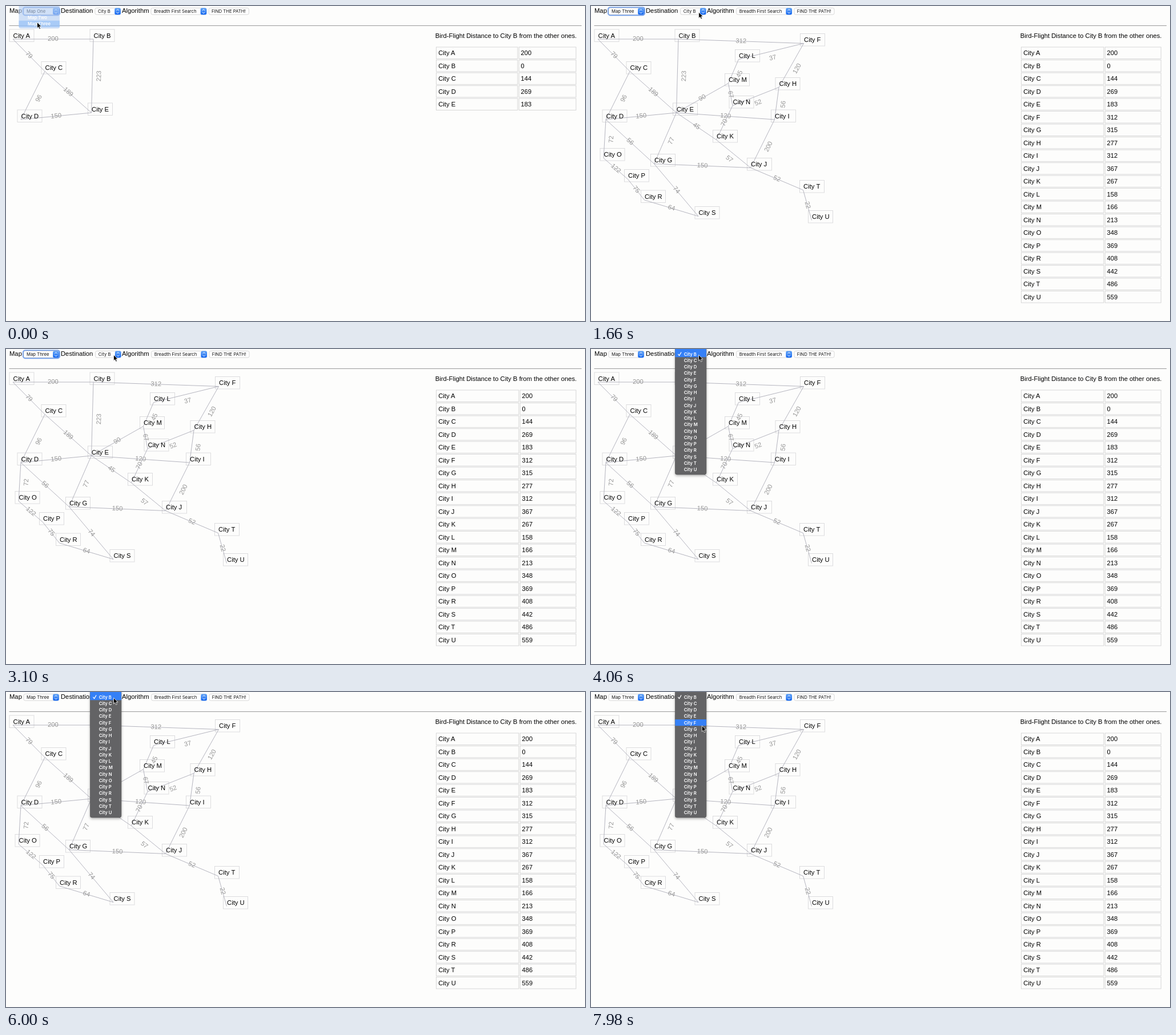
Recreate the animation shown at these times as an HTML page. Size 1014 by 552 pixels, loop 8 s.

```html
<!DOCTYPE html>
<html lang="en">
<head>
<meta charset="utf-8">
<title>Path finder</title>
<style>
html, body { margin: 0; width: 100%; height: 100%; overflow: hidden; background: #fdfdfc; }
svg { display: block; width: 1014px; height: 552px; }
text { font: 11.25px "Liberation Sans", Arial, sans-serif; fill: #000; }
.ui { font: 7.73px Inter, sans-serif; fill: #111; }
.item { font: 600 7.73px Inter, sans-serif; fill: #fff; }
.cost { fill: #969696; text-anchor: middle; }
.road { stroke: #adadb8; stroke-width: .9; }
.box { fill: none; stroke: #d9d9db; stroke-width: .9; }
.cell { fill: none; stroke: #d3d3d3; stroke-width: .9; }
.control { fill: #fff; stroke: #c6c6c6; stroke-width: .7; }
</style>
</head>
<body>
<svg id="stage" viewBox="0 0 1014 552" xmlns="http://www.w3.org/2000/svg">
  <defs>
    <linearGradient id="blue" x2="0" y2="1">
      <stop offset="0" stop-color="#62a4f8"/><stop offset="1" stop-color="#1768ef"/>
    </linearGradient>
    <filter id="shade" x="-30%" y="-10%" width="160%" height="120%">
      <feDropShadow dx="0" dy="2" stdDeviation="2.2" flood-opacity=".3"/>
    </filter>
  </defs>
</svg>
<script>
const LOOP = 8000, MAP_AT = 110, OPEN_AT = 3700, ROW = 11.25;
const svg = document.getElementById("stage");

// top left corner of each city's label box
const cities = {
  A: [6, 41], B: [147, 41], C: [62, 97.5], D: [20, 182], E: [143.5, 170],
  F: [366.5, 48.5], G: [104.5, 259.5], H: [323, 125.5], I: [315.5, 182], J: [273.5, 266.5],
  K: [213.5, 217.5], L: [252.5, 76.5], M: [234.5, 118.5], N: [242, 157.5], O: [16, 249.5],
  P: [58.5, 286.5], R: [87.5, 323], S: [182, 351.5], T: [365.5, 305.5], U: [380.5, 358.5]
};
const birdFlight = [200, 0, 144, 269, 183, 312, 315, 277, 312, 367,
  267, 158, 166, 213, 348, 369, 408, 442, 486, 559];
const names = Object.keys(cities);
// roads pointing left carry their cost below the line
const smallRoads = "AB200 AC79 CE189 BE223 CD96 DE150";
const largeRoads = smallRoads + " BF312 EM90 FL37 LM45 MN67 HN52 HI56 FH120 EI120 KN70" +
  " EK45 JK57 EG77 DO72 DG56 OP122 PR75 RS64 GS74 GJ150 IJ200 JT52 TU22";

function add(parent, tag, attrs, content) {
  const el = document.createElementNS("http://www.w3.org/2000/svg", tag);
  for (const k in attrs) el.setAttribute(k, attrs[k]);
  if (content !== undefined) el.textContent = content;
  parent.append(el);
  return el;
}
const group = (parent, attrs) => add(parent, "g", attrs);
const rect = (parent, x, y, width, height, attrs) =>
  add(parent, "rect", { x, y, width, height, ...attrs });
const label = (parent, x, y, content, cls = "") =>
  add(parent, "text", { x, y, class: cls }, content);
const show = (el, on) => el.setAttribute("visibility", on ? "visible" : "hidden");

function drawRoad(parent, road) {
  const [x1, y1, x2, y2] = [...road.slice(0, 2)].flatMap(c => [cities[c][0] + 6, cities[c][1] + 17]);
  add(parent, "line", { x1, y1, x2, y2, class: "road" });
  const back = x2 < x1;
  const angle = Math.atan2(y2 - y1, x2 - x1) * 180 / Math.PI + (back ? 180 : 0);
  add(parent, "text", {
    class: "cost", y: back ? 15 : 3,
    transform: `translate(${(x1 + x2) / 2} ${(y1 + y2) / 2}) rotate(${angle})`
  }, road.slice(2));
}

function drawMap(count, roads, split) {
  const g = group(svg);
  const shown = names.slice(0, count);
  shown.forEach(c => rect(g, ...cities[c], 43, 21.5, { class: "box" }));
  roads.split(" ").forEach(r => drawRoad(g, r));
  shown.forEach((c, i) => {
    const y = 72 + i * 22.5;
    label(g, cities[c][0] + 6.6, cities[c][1] + 14.7, "City " + c);
    rect(g, 753.5, y, split - 753.5, 20.5, { class: "cell" });
    rect(g, split + 2.3, y, 995.9 - split, 20.5, { class: "cell" });
    label(g, 757.2, y + 14, "City " + c);
    label(g, split + 5.5, y + 14, birdFlight[i]);
  });
  return g;
}

function drawSelect(parent, x, width, value) {
  const g = group(parent);
  rect(g, x, 3.6, width, 11.4, { class: "control", rx: 2.6 });
  const ax = x + width - 10.4;
  rect(g, ax, 3.4, 10.7, 11.8, { rx: 2.6, fill: "url(#blue)" });
  add(g, "path", {
    d: `M${ax + 3.4} 7.9l2-2.1 2 2.1m-4 2.9l2 2.1 2-2.1`,
    fill: "none", stroke: "#fff", "stroke-width": 1, "stroke-linecap": "round"
  });
  return label(g, x + 5, 12, value, "ui");
}

label(svg, 6, 12, "Map");
label(svg, 96, 12, "Destination");
label(svg, 203, 12, "Algorithm");
add(svg, "line", { x1: 5.5, x2: 1008, y1: 34.4, y2: 34.4, stroke: "#8d8d8d", "stroke-width": .9 });
label(svg, 751.8, 56.2, "Bird-Flight Distance to City B from the other ones.");

const ring = rect(svg, 30, 2.4, 64, 13.8, { rx: 3.6, fill: "none", stroke: "#6d9cec", "stroke-width": 2 });
const mapValue = drawSelect(svg, 31, 61.5, "Map One");
const right = group(svg);
drawSelect(right, 156, 44.6, "City B");
drawSelect(right, 254, 97, "Breadth First Search");
rect(right, 355.3, 3.6, 70, 11.4, { class: "control", rx: 2.6 });
label(right, 360, 12, "FIND THE PATH!", "ui");

const small = drawMap(5, smallRoads, 896);
const large = drawMap(20, largeRoads, 898);

// closing map menu
const mapMenu = group(svg);
rect(mapMenu, 22.5, -4, 71.5, 43.5, { rx: 3.5, fill: "#b4cdf3", opacity: .62 });
rect(mapMenu, 22.5, 25.6, 71.5, ROW, { fill: "#8fbcf8", opacity: .6 });
label(mapMenu, 38, 23, "Map Two", "item");
label(mapMenu, 38, 34.2, "Map Three", "item");

// destination menu
const menu = group(svg);
rect(menu, 147.3, -4, 54.6, 224, { rx: 3.5, fill: "#646465", stroke: "#505050", "stroke-width": .6, filter: "url(#shade)" });
const mark = rect(menu, 147.3, 3, 54.6, ROW, { fill: "#3580f6" });
add(menu, "path", {
  d: "M152.7 9.2l1.9 2.3 3.3-5.6", fill: "none", stroke: "#fff", "stroke-width": 1.2,
  "stroke-linecap": "round", "stroke-linejoin": "round"
});
names.slice(1).forEach((c, i) => label(menu, 162.7, 11.5 + i * ROW, "City " + c, "item"));

const cursor = add(svg, "path", {
  d: "M0 0V10.4L2.4 8.2 4 12 5.9 11.2 4.3 7.5H7.6Z",
  fill: "#000", stroke: "#fff", "stroke-width": .8, "stroke-linejoin": "round"
});

// time, x, y of the pointer
const track = [[0, 54.5, 28.5], [260, 55, 28.5], [1300, 189, 11.5], [1660, 188.7, 11],
  [3100, 188.5, 10.3], [6600, 188.5, 10.3], [7260, 192.5, 35], [7980, 194.3, 59]];

function pointer(t) {
  let i = 1;
  while (i < track.length - 1 && t > track[i][0]) i++;
  const [a, b] = [track[i - 1], track[i]];
  let p = Math.min(1, (t - a[0]) / (b[0] - a[0]));
  if (i < 6) p = p * p * (3 - 2 * p);
  return [a[1] + (b[1] - a[1]) * p, a[2] + (b[2] - a[2]) * p];
}

function render(t) {
  const [x, y] = pointer(t), chosen = t >= MAP_AT, open = t >= OPEN_AT;
  cursor.setAttribute("transform", `translate(${x} ${y})`);
  show(small, !chosen);
  show(large, chosen);
  mapValue.textContent = chosen ? "Map Three" : "Map One";
  right.setAttribute("transform", `translate(${chosen ? .7 : 0} 0)`);
  mapMenu.setAttribute("opacity", Math.max(0, 1 - t / MAP_AT));
  show(ring, !open);
  show(menu, open);
  const row = Math.max(0, Math.floor((y - 3) / ROW));
  mark.setAttribute("y", row ? 3 + row * ROW : 0);
  mark.setAttribute("height", row ? ROW : ROW + 3);
}

const start = performance.now();
function tick() {
  render((performance.now() - start) % LOOP);
  requestAnimationFrame(tick);
}
render(0);
requestAnimationFrame(tick);
</script>
</body>
</html>
```
